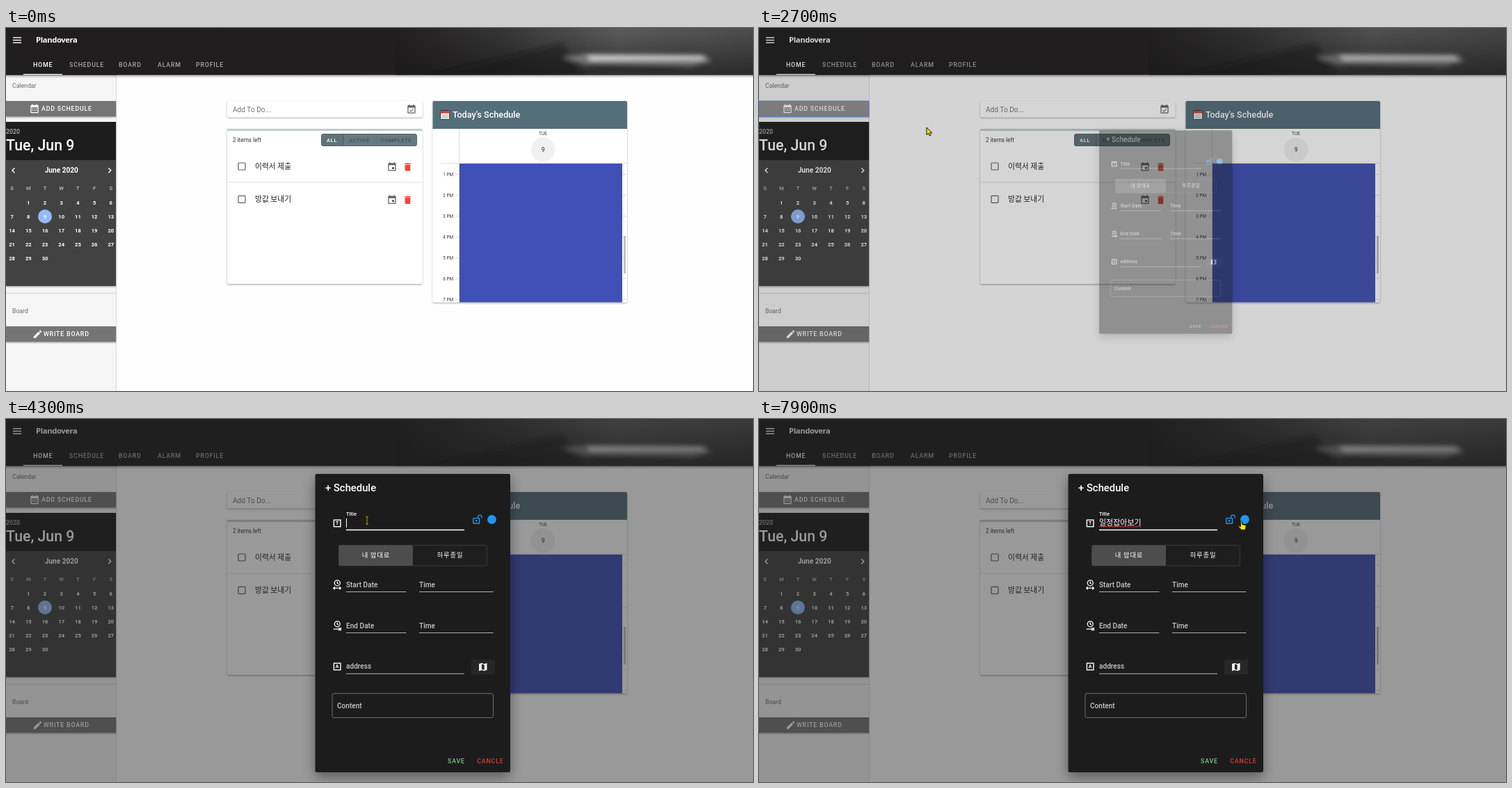
An HTML page for the animation above (8 s loop, 1074 by 522 pixels).

```html
<!DOCTYPE html>
<html lang="en">
<head>
<meta charset="utf-8">
<title>Planner</title>
<style>
html, body { margin: 0; width: 100%; height: 100%; overflow: hidden; background: #fefefe; }
svg { display: block; width: 100%; height: 100%; font-family: Roboto, "Noto Sans CJK KR", "Noto Sans CJK", sans-serif; }
text { white-space: pre; }
</style>
</head>
<body>
<svg id="stage" viewBox="0 0 1074 522"></svg>
<script>
const LOOP = 8000;
const KR = '"Noto Sans CJK KR", "Noto Sans CJK", sans-serif';
const frame = 'M16 1v2H8V1H6v2H5a2 2 0 0 0-2 2v14a2 2 0 0 0 2 2h14a2 2 0 0 0 2-2V5a2 2 0 0 0-2-2h-1V1zM19 19H5V8h14z';
const icons = {
  event: frame + 'M17 12h-5v5h5z',
  check: frame + 'M10.6 17.9L17 11.5l-1.1-1.1-5.3 5.3-2.3-2.3-1.1 1.1z',
  grid: frame + [7, 11, 15].map(x => `M${x} 10h2v2h-2zm0 4h2v2h-2z`).join(''),
  trash: 'M6 19a2 2 0 0 0 2 2h8a2 2 0 0 0 2-2V7H6zM19 4h-3.5l-1-1h-5l-1 1H5v2h14z',
  pencil: 'M3 17.2V21h3.8L17.8 9.9l-3.7-3.7zM20.7 7a1 1 0 0 0 0-1.4l-2.3-2.3a1 1 0 0 0-1.4 0l-1.8 1.8 3.7 3.8z',
  map: 'M20.5 3L15 5.1 9 3 3.4 4.9a.5.5 0 0 0-.4.5v15.1a.5.5 0 0 0 .7.5L9 18.9l6 2.1 5.6-1.9a.5.5 0 0 0 .4-.5V3.5a.5.5 0 0 0-.5-.5zM15 19l-6-2.1V5l6 2.1z'
};

// Markup helpers; text is placed by its vertical centre.
const rect = (x, y, w, h, fill, more = '') =>
  `<rect x="${x}" y="${y}" width="${w}" height="${h}" fill="${fill}" ${more}/>`;
const text = (x, y, s, size, fill, more = '') =>
  `<text x="${x}" y="${y + size * .355}" font-size="${size}" fill="${fill}" ${more}>${s}</text>`;
const caps = (x, y, s, fill, size = 8.86, more = '') =>
  text(x, y, s, size, fill, `font-weight="500" letter-spacing="${size * .0893}" ${more}`);
const line = (x1, y1, x2, y2, stroke, w = 1) =>
  `<path d="M${x1} ${y1}L${x2} ${y2}" stroke="${stroke}" stroke-width="${w}"/>`;
const icon = (name, cx, cy, fill, s = .633) =>
  `<path d="${icons[name]}" fill="${fill}" fill-rule="evenodd" transform="translate(${cx - 12 * s} ${cy - 12 * s}) scale(${s})"/>`;
const range = n => [...Array(n).keys()];
const MID = 'text-anchor="middle"', W5 = 'font-weight="500"', W7 = 'font-weight="700"';
const SHADOW = 'filter="url(#card)"';

const defs = `<defs>
  <linearGradient id="photo"><stop offset="0" stop-color="#1f1d1d"/><stop offset=".52" stop-color="#201e1e"/>
    <stop offset=".66" stop-color="#353434"/><stop offset=".82" stop-color="#5a5959"/><stop offset="1" stop-color="#4c4b4b"/></linearGradient>
  <linearGradient id="shade" x2="0" y2="1"><stop offset=".1" stop-color="#181717" stop-opacity="0"/>
    <stop offset="1" stop-color="#181717" stop-opacity=".65"/></linearGradient>
  <linearGradient id="under" x2="0" y2="1"><stop offset="0" stop-opacity=".35"/><stop offset="1" stop-opacity="0"/></linearGradient>
  <filter id="soft" x="-20%" y="-60%" width="140%" height="220%"><feGaussianBlur stdDeviation="3"/></filter>
  <filter id="card" x="-5%" y="-20%" width="110%" height="150%"><feDropShadow dx="0" dy="1.1" stdDeviation=".8" flood-opacity=".38"/></filter>
  <filter id="lift" x="-20%" y="-20%" width="140%" height="140%"><feDropShadow dx="0" dy="7" stdDeviation="9" flood-opacity=".4"/></filter>
  <clipPath id="bar"><rect width="1074" height="67.5"/></clipPath>
</defs>`;

function header() {
  const tabs = [[91, 'SCHEDULE'], [162, 'BOARD'], [218, 'ALARM'], [273, 'PROFILE']];
  return rect(0, 67, 1074, 5, 'url(#under)') + rect(0, 0, 1074, 67.5, 'url(#photo)') +
    `<g clip-path="url(#bar)">${rect(560, 0, 514, 68, 'url(#shade)')}
      <g filter="url(#soft)"><path d="M600 70L800 22 830 68z" fill="#191818" opacity=".5"/>
      <path d="M800 42L840 36 1005 38 1014 48 965 60 850 58z" fill="#747474"/>
      <path d="M835 52L985 54 955 64 850 62z" fill="#2b2a2a"/></g>
      <path d="M834 40L1000 41 1006 46 840 47z" fill="#d4d4d4" filter="url(#soft)"/></g>` +
    [13.8, 17.5, 21.2].map(y => line(10, y, 22, y, '#fff', 1.4)).join('') +
    text(43, 17.3, 'Plandovera', 11.2, '#fff', W7 + ' font-family="Open Sans, sans-serif" letter-spacing="-.35"') +
    caps(39, 52.5, 'HOME', '#fff') + tabs.map(([x, s]) => caps(x, 52.5, s, '#a8a7a7')).join('') +
    rect(25, 66, 56, 1.6, '#fff');
}

function sidebar() {
  const col = i => 8.6 + 23.7 * i;
  const days = range(30).map(i => {
    const c = (i + 1) % 7, r = Math.floor((i + 1) / 7);
    return text(col(c), 251 + 20 * r, i + 1, 7.6, '#fff', W7 + MID.padStart(21));
  }).join('');
  return rect(0, 68, 158, 454, '#f5f5f5') + line(158.5, 68, 158.5, 522, '#d9d9d9') + rect(0, 67, 159, 5, 'url(#under)') +
    text(9, 82.5, 'Calendar', 8.7, '#6a6a6a') +
    rect(0, 105, 158, 22.3, '#757575', 'id="add" ' + SHADOW) +
    `<rect id="ring" x=".5" y="105" width="157.5" height="22.5" fill="none" stroke="#6d8fe6"/>` +
    icon('grid', 41, 116.5, '#fff') + caps(51, 116.3, 'ADD SCHEDULE', '#fff') +
    rect(0, 135, 158, 236, '#424242', SHADOW) + rect(0, 135, 158, 55, '#1d1d1d') +
    text(0, 148.5, '2020', 8.86, '#b4b4b4', W5) + text(0, 168.8, 'Tue, Jun 9', 21.3, '#fff', W5) +
    text(79.8, 204.3, 'June 2020', 10.13, '#fff', W7 + ' ' + MID) +
    `<path d="M12.4 201.4l-3.4 3.4 3.4 3.4M147.4 201.4l3.4 3.4-3.4 3.4" fill="none" stroke="#fff" stroke-width="1.4"/>` +
    [...'SMTWTFS'].map((d, i) => text(col(i), 230.3, d, 7.6, '#b0b0b0', 'font-weight="600" ' + MID)).join('') +
    `<circle cx="56" cy="271" r="10" fill="#92baf7"/>` + days +
    line(0, 381.5, 158, 381.5, '#d5d5d5') + text(9, 406.5, 'Board', 8.7, '#6a6a6a') +
    rect(0, 429, 158, 22.3, '#757575', SHADOW) + icon('pencil', 45.5, 440.3, '#fff') +
    caps(54, 440.3, 'WRITE BOARD', '#fff');
}

function todo() {
  const row = (y, s) =>
    rect(334, y - 5, 10, 10, 'none', 'rx="1" stroke="#5f5f5f" stroke-width="1.2"') +
    text(358, y - .3, s, 10.8, '#222', `font-family='${KR}'`) +
    icon('event', 555, y + .9, '#616161') + icon('trash', 577.5, y + .9, '#f44336');
  return rect(318, 105, 280.5, 23.3, '#fff', 'rx="2" ' + SHADOW) +
    text(326, 117, 'Add To Do...', 10.13, '#737373') + icon('check', 583, 117, '#616161') +
    rect(318, 145, 280.5, 223, '#fff', 'rx="2" ' + SHADOW) + rect(318, 145, 280.5, 3, '#c3cdcb') +
    text(326, 161.3, '2 items left', 8.2, '#333') +
    rect(453.5, 152.5, 137, 17, '#667a80', 'rx="2.5" stroke="#526368"') +
    rect(454, 153, 31, 16, '#5f7379', 'rx="2"') +
    line(485, 153, 485, 169, '#48575c') + line(532.5, 153, 532.5, 169, '#5f7278') +
    caps(461, 161.2, 'ALL', '#fff', 7.6) + caps(493, 161.2, 'ACTIVE', '#404e53', 7.6) +
    caps(539, 161.2, 'COMPLETE', '#404e53', 7.6) +
    row(199, '이력서 제출') + line(318, 222, 598, 222, '#dedede') + row(246.3, '방값 보내기');
}

function today() {
  const hours = range(7).map(i => {
    const y = 210.5 + 30 * i;
    return line(646, y, 652, y, '#dcdcdc') + line(886, y, 892, y, '#dcdcdc') +
      text(643, y, i + 1 + ' PM', 6.4, '#333', 'text-anchor="end"');
  }).join('');
  return rect(613.5, 105, 279.5, 289.5, '#fff', 'rx="2" ' + SHADOW) +
    `<path d="M613.5 145V107a2 2 0 0 1 2-2H891a2 2 0 0 1 2 2V145z" fill="#546e7a"/>` +
    rect(624.7, 118.5, 13, 13, '#eee', 'rx="1" stroke="#37383b"') + rect(625, 119, 12.4, 3.6, '#d8402f') +
    range(3).map(i => line(627, 125 + 2 * i, 635.5, 125 + 2 * i, '#a9adb0', .8)).join('') +
    text(642, 125, "Today's Schedule", 12.66, '#fff', W5) +
    line(651.5, 145, 651.5, 394.5, '#ddd') + line(625, 194.5, 893, 194.5, '#ddd') +
    text(772, 152, 'TUE', 6.5, '#333', MID) + `<circle cx="772" cy="175" r="17.5" fill="#f1f1f1"/>` +
    text(772, 175, '9', 8.4, '#222', MID) + hours + rect(652, 195, 234, 199.5, '#3f51b5') +
    rect(888, 299, 3, 54, '#c1c1c1');
}

function dialog() {
  const soft = '#c6c6c6', rule = '#b2b2b2';
  const field = (x, y, s, end) => text(x, y, s, 10.1, soft, W5) + line(x, y + 10.5, end, y + 10.5, rule);
  const letter = (y, s) => rect(471.4, y - 4.8, 9.6, 9.6, 'none', 'stroke="#fff" stroke-width="1.4"') +
    text(476.2, y, s, 7, '#fff', W7 + ' ' + MID);
  const clock = (y, tip) => `<g fill="none" stroke="#fff" stroke-width="1.3"><circle cx="476.3" cy="${y - 2.2}" r="4"/>
    <path d="M476.3 ${y - 4.6}v2.6l1.8 1"/><path d="M470.8 ${y + 5.2}h10.6${tip}"/></g>`;
  const kr = `font-family='${KR}' ${W5} ${MID} letter-spacing=".8"`;
  return rect(444.5, 79, 280.5, 429, '#1e1e1e', 'rx="2.5" filter="url(#lift)"') +
    text(459, 98.5, '+ Schedule', 14.8, '#fff', W5) +
    letter(150, 'T') + line(489, 159.5, 659, 159.5, rule) +
    `<text id="label" x="489" font-weight="500">Title</text>
     <path id="active" stroke="#fff" stroke-width="1.5"/>
     <path id="spell" d="M489 154.6${'q1 -1.6 2 0t2 0'.repeat(15)}" fill="none" stroke="#e53935" stroke-width=".9"/>` +
    text(489, 149.3, '', 11, '#fff', `id="typed" font-family='${KR}'`) +
    rect(0, 143, 1, 13, '#fff', 'id="caret"') +
    `<g fill="none" stroke="#2196f3" stroke-width="1.4"><rect x="671.8" y="142.6" width="8.8" height="7.6" rx=".8"/>
     <path d="M678.6 142.4v-1.6a2.7 2.7 0 0 1 5.4 0v1.8"/></g><circle cx="676.2" cy="146.4" r="1.3" fill="#2196f3"/>
     <circle cx="698.5" cy="144.5" r="6.4" fill="#2196f3"/>` +
    rect(478.5, 181.5, 213, 29.5, '#1e1e1e', 'rx="2.5" stroke="#393939"') + rect(478.5, 181.5, 106.5, 29.5, '#4d4d4d', 'rx="2"') +
    text(532, 196, '내 맘대로', 9.4, '#fff', kr) + text(638.5, 196, '하루종일', 9.4, '#fff', kr) +
    clock(238, 'm-8.6 -2l-2 2 2 2m6.6 -4l2 2-2 2') + field(489, 238, 'Start Date', 575.5) + field(594, 238, 'Time', 700.5) +
    clock(297, 'm-3 -2l2 2-2 2m3 -4.4v4.8') + field(489, 297, 'End Date', 575.5) + field(594, 297, 'Time', 700.5) +
    letter(356, 'A') + field(489, 355.8, 'address', 659) +
    rect(668.7, 346, 34.5, 21.5, '#272727', 'rx="2"') + icon('map', 685.8, 356.6, '#fff') +
    rect(469, 394.7, 231.5, 34.8, 'none', 'rx="2.5" stroke="#6f6f6f"') + text(476, 412, 'Content', 10.1, soft, W5) +
    caps(635, 492.3, 'SAVE', '#81c784') + caps(677.3, 492.3, 'CANCLE', '#e53935');
}

const pointers = `<g id="pointer" stroke-linejoin="round">
  <path id="arrow" d="M0 0V10.6L2.6 8.4 4.3 12 6 11.2 4.3 7.8H7.8z" fill="#ffee00" stroke="#111"/>
  <path id="hand" d="M1.4.8Q2.6-.4 3.6.8V4.6L8.4 5.6Q9.4 6 9.2 7.4L8.2 12.4H2.6L-1.8 7.6Q-1.8 6 .2 7L1.4 8z" transform="translate(-1)" fill="#ffee00" stroke="#111"/>
  <path id="beam" d="M-2-5.2H2M0-5.2V5.2M-2 5.2H2" fill="none" stroke="#9b9a12" stroke-width="1.1"/></g>`;

document.getElementById('stage').innerHTML = defs + header() + sidebar() + todo() + today() +
  rect(0, 0, 1074, 522, '#212121', 'id="dim"') + `<g id="dialog">${dialog()}</g>` + pointers;

const el = id => document.getElementById(id);
const set = (id, attrs) => { for (const k in attrs) el(id).setAttribute(k, attrs[k]); };
const show = (id, on) => set(id, { visibility: on ? 'visible' : 'hidden' });

const path = [
  [400, 956, 122], [800, 800, 215], [1100, 633, 272], [1200, 671, 270], [1400, 600, 273], [1700, 443, 252],
  [1900, 250, 190], [2100, 130, 127], [2200, 110, 117], [2500, 112, 118], [2600, 232, 143], [2700, 241, 143],
  [2800, 411, 166], [2900, 445, 176], [3000, 453, 190], [3200, 480, 236], [3500, 648, 200], [3700, 600, 135],
  [4000, 519, 146], [7300, 519, 146], [7500, 560, 110], [7600, 620, 77], [7800, 704, 135], [7900, 692, 147]
];
const kinds = [[0, 'arrow'], [2100, 'hand'], [2700, 'arrow'], [3700, 'beam'], [7500, 'arrow'], [7800, 'hand']];
const typing = [
  [0, ''], [4700, '이'], [4800, '일'], [4900, '일저'], [5000, '일정'], [5300, '일정자'], [5400, '일정잡'],
  [5600, '일정잡ㅇ'], [5700, '일정잡아'], [5900, '일정잡아보ㄱ'], [6100, '일정잡아보고'],
  [6700, '일정잡아보'], [6900, '일정잡아보ㄱ'], [7000, '일정잡아보기']
];
const dims = [[0, 0], [2700, .19], [2800, .4], [2900, .46]];
const opening = [[0, 0], [2700, .364], [2800, .914], [2900, .985], [3000, 1]];
const focusing = [[0, 0], [4100, .35], [4200, .8], [4300, 1]];
const buttons = [[0, '#757575'], [2200, '#838383'], [2500, '#9a9a9a'], [2700, '#919191'], [4100, '#757575']];

const at = (steps, t) => steps.filter(s => s[0] <= t).pop()[1];

function place(t) {
  const i = path.findIndex(p => p[0] > t);
  if (i < 0) return path[path.length - 1].slice(1);
  if (i === 0) return [path[0][1], path[0][2]];
  const a = path[i - 1], b = path[i], k = (t - a[0]) / (b[0] - a[0]);
  return [a[1] + (b[1] - a[1]) * k, a[2] + (b[2] - a[2]) * k];
}

function draw(time) {
  const t = Math.floor((time % LOOP) / 100) * 100;
  set('add', { fill: at(buttons, t) });
  show('ring', t >= 2500 && t < 4100);
  set('dim', { opacity: at(dims, t) });

  const p = at(opening, t), s = .5 + p / 2;
  set('dialog', { opacity: p, transform: `translate(584.7 293.5) scale(${s}) translate(-584.7 -293.5)` });

  const f = at(focusing, t), size = 10.1 - 2.5 * f;
  set('label', { y: 149.8 - 13.4 * f + size * .355, 'font-size': size, fill: f ? '#fff' : '#c6c6c6' });
  set('active', { d: `M${574 - 85 * f} 159.5H${574 + 85 * f}`, opacity: f ? 1 : 0 });

  const typed = at(typing, t);
  el('typed').textContent = typed;
  set('caret', { x: 489 + typed.length * 10.12, opacity: (t >= 4200 && t < 4600) || (t >= 6600 && t < 6800) ? 1 : 0 });
  set('spell', { opacity: t >= 7400 ? 1 : 0 });

  const [x, y] = place(t), kind = at(kinds, t);
  set('pointer', { transform: `translate(${x} ${y})`, opacity: t < 400 ? 0 : 1 });
  for (const k of ['arrow', 'hand', 'beam']) show(k, k === kind);
}

const start = performance.now();
function tick() {
  draw(performance.now() - start);
  requestAnimationFrame(tick);
}
tick();
</script>
</body>
</html>
```
